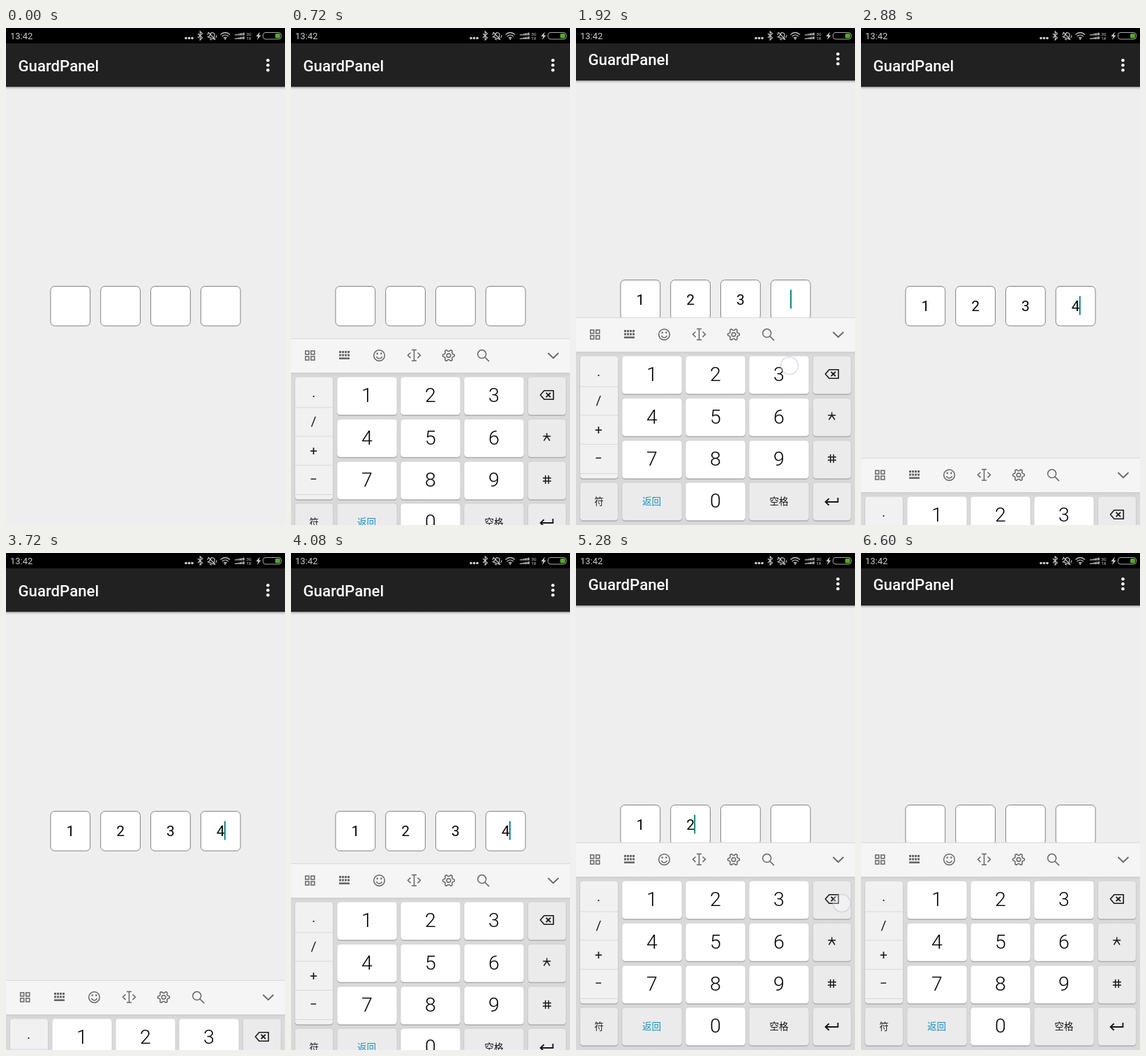
An HTML page for the animation above (6840 ms loop, 400 by 711 pixels).

```html
<!DOCTYPE html>
<html lang="en">
<head>
<meta charset="utf-8">
<title>Code entry</title>
<style>
  html, body { margin: 0; width: 100%; height: 100%; overflow: hidden; background: #eee; }
  svg { display: block; width: 100%; height: 100%; }
  text { font-family: Roboto, "Noto Sans", sans-serif; }
  .mid { text-anchor: middle; }
  .num { font: 300 28.5px Roboto, "Noto Sans", sans-serif; fill: #000; }
  .sym { font: 19px Roboto, sans-serif; fill: #181818; }
  .cjk { font: 500 13.5px "Noto Sans CJK SC", "Noto Sans CJK", sans-serif; }
  .line { fill: none; stroke: #666; stroke-width: 1.5; }
  .ink { fill: none; stroke: #181818; stroke-width: 1.6; }
  .stat { fill: none; stroke: #c4c4c4; stroke-width: 1.2; }
</style>
</head>
<body>
<svg viewBox="0 0 400 711" preserveAspectRatio="none">
  <defs>
    <linearGradient id="shade" x2="0" y2="1">
      <stop offset="0" stop-color="#888"/>
      <stop offset=".4" stop-color="#d2d2d2"/>
      <stop offset="1" stop-color="#eee"/>
    </linearGradient>
    <linearGradient id="bed" x2="0" y2="1">
      <stop offset="0" stop-color="#cfcfcf"/>
      <stop offset=".02" stop-color="#dadada"/>
      <stop offset="1" stop-color="#d8d8d8"/>
    </linearGradient>
  </defs>
  <rect width="400" height="711" fill="#eee"/>

  <g id="app">
    <rect y="22" width="400" height="62" fill="#212121"/>
    <rect y="84" width="400" height="4.5" fill="url(#shade)"/>
    <text x="17.5" y="62" font-size="22.2" font-weight="500" fill="#fff">GuardPanel</text>
    <g fill="#fff">
      <circle cx="375.5" cy="46.3" r="2.3"/>
      <circle cx="375.5" cy="53.3" r="2.3"/>
      <circle cx="375.5" cy="60.3" r="2.3"/>
    </g>
    <g id="boxes"></g>
    <rect id="cursor" y="383.5" width="2" height="27" fill="#0b8686"/>
  </g>

  <g id="keyboard">
    <rect width="400" height="49" fill="#f5f5f5"/>
    <rect width="400" height="1" fill="#d9d9d9"/>
    <rect y="49" width="400" height="248" fill="url(#bed)"/>
    <g class="line">
      <path d="M20.7 18h5v5h-5zM28.7 18h5v5h-5zM20.7 26h5v5h-5zM28.7 26h5v5h-5z"/>
      <path d="M69 19.5h15M69 24h15" stroke-width="3" stroke-dasharray="3 1"/>
      <path d="M69 28.7h15" stroke-width="2.6"/>
      <circle cx="126.5" cy="24.5" r="7.8"/>
      <path d="M122.3 26.2q4.2 5.6 8.4 0"/>
      <path d="M123.7 20.5v2.4M129.3 20.5v2.4" stroke-width="2"/>
      <path d="M173 16.5h7M176.5 16.5v15.5M173 32h7M171.5 20.5l-4 3.8 4 3.8M181.5 20.5l4 3.8-4 3.8"/>
      <path id="gear" stroke-linejoin="round"/>
      <circle cx="226" cy="24.5" r="2.8"/>
      <circle cx="273.7" cy="22.6" r="6"/>
      <path d="M278 27l6 6" stroke-width="1.7"/>
      <path d="M368.5 21l7.5 7.2 7.5-7.2" stroke-width="1.8"/>
    </g>
    <g id="keys"></g>
    <g class="ink">
      <path d="M357.5 81l5.5-6.2h13.3v12.4h-13.3z" stroke-linejoin="round"/>
      <path d="M365.7 77.8l6.4 6.4M372.1 77.8l-6.4 6.4" stroke-width="1.9"/>
      <path d="M366.8 135.5v5M361.3 140h11M366.8 140l-4.3 6.5M366.8 140l4.3 6.5" stroke-width="1.4"/>
      <path d="M364.8 196v12M369.3 196v12M361 199.8h12M361 204.3h12" stroke-width="1.5"/>
      <path d="M375.5 258v6h-17M362.7 259.3l-5 4.7 5 4.7" stroke-width="1.9"/>
    </g>
  </g>

  <circle id="touch" r="12.5"/>

  <rect width="400" height="22" fill="#000"/>
  <text x="6" y="16" font-size="13" fill="#ccc">13:42</text>
  <g fill="#d0d0d0">
    <circle cx="258" cy="14.5" r="1.8"/>
    <circle cx="262.5" cy="14.5" r="1.8"/>
    <circle cx="267" cy="14.5" r="1.8"/>
    <path d="M364 5.5l-5.5 6.5h3l-1.5 5 5.5-6.5h-3z"/>
    <g id="bars"></g>
    <text x="344.5" y="10.5" font-size="6">3G</text>
    <text x="344.5" y="16.5" font-size="6">1X</text>
  </g>
  <g class="stat">
    <path d="M275 8l6.5 6-3.2 3v-12l3.2 3-6.5 6"/>
    <path transform="rotate(20 295 11)" d="M290.5 14.5q2-1.5 2-5 0-3 3-3t3 3q0 3.5 2 5zM294 16.5h3M289 8v4M301.5 8v4"/>
    <path d="M290 6l10 10.5"/>
    <path d="M307.5 9.5q6.8-6 13.6 0M309.7 12q4.6-4 9.2 0M312 14.3q2.3-2 4.6 0"/>
    <circle cx="314.3" cy="15.5" r=".6"/>
    <rect x="368.5" y="6.5" width="26" height="9.5" rx="3.5" stroke="#aaa" stroke-width="1"/>
  </g>
  <rect x="386" y="8" width="7" height="6.5" rx="1.5" fill="#4fae1f"/>
</svg>
<script>
const LOOP = 6840, TICK = 120, KEYBOARD_TOP = 414, KEYBOARD_H = 297;
const $ = id => document.getElementById(id);

function add(parent, tag, attrs, label = '') {
  const el = document.createElementNS('http://www.w3.org/2000/svg', tag);
  for (const k in attrs) el.setAttribute(k, attrs[k]);
  el.textContent = label;
  return parent.appendChild(el);
}

// Code boxes
const BOX_STEP = 71.8;
const digits = [0, 1, 2, 3].map(i => {
  const x = 63.9 + BOX_STEP * i;
  add($('boxes'), 'rect', { x, y: 369.5, width: 56.8, height: 56.6, rx: 6, fill: '#fff', stroke: '#777', 'stroke-width': .9 });
  return add($('boxes'), 'text', { x: x + 28.4, y: 405.3, class: 'mid', 'font-size': 21, fill: '#0a0a0a' }, i + 1);
});

// Keys
const COLS = [[5.5, 55], [66, 86], [157, 86], [248, 86], [339.5, 55]];
const ROWS = [55, 115.5, 176, 236];
const keyRects = {};

function addKey(name, col, row, fill, height = 54.5) {
  const [x, width] = COLS[col], y = ROWS[row];
  const shape = { x, width, height, rx: 4.5 };
  add($('keys'), 'rect', { ...shape, y: y + 1.3, fill: '#a3a3a3' });
  keyRects[name] = add($('keys'), 'rect', { ...shape, y, fill, stroke: '#c4c4c4', 'stroke-width': .6 });
  keyRects[name].dataset.fill = fill;
}
function addLabel(label, x, y, cls, attrs = {}) {
  add($('keys'), 'text', { x, y, class: 'mid ' + cls, ...attrs }, label);
}

const GRAY = '#ebebec';
addKey('symbols', 0, 0, '#f1f1f1', 175.5);
for (const y of [98.5, 139.5, 181, 223])
  add($('keys'), 'rect', { x: 6, y, width: 54, height: 1, fill: '#d8d8d8' });
[['.', 84], ['/', 125], ['+', 167], ['−', 208]].forEach(([s, y]) => addLabel(s, 32.5, y, 'sym'));
for (let n = 1; n <= 9; n++) {
  const col = (n - 1) % 3, row = Math.floor((n - 1) / 3);
  addKey(n, col + 1, row, '#fff');
  addLabel(n, 109 + 91 * col, ROWS[row] + 36, 'num');
}
['del', 'star', 'hash', 'enter'].forEach((name, row) => addKey(name, 4, row, GRAY));
addKey('more', 0, 3, GRAY);
addKey('back', 1, 3, GRAY);
addKey(0, 2, 3, '#fff');
addKey('space', 3, 3, GRAY);
addLabel('符', 33, 267.5, 'cjk', { fill: '#222' });
addLabel('返回', 108.5, 267.5, 'cjk', { fill: '#1590cc' });
addLabel(0, 200, 272, 'num');
addLabel('空格', 291, 267.5, 'cjk', { fill: '#111' });

// Gear outline and signal bars
$('gear').setAttribute('d', 'M' + Array.from({ length: 48 }, (_, i) => {
  const a = i / 48 * 2 * Math.PI, r = 7.2 + 1.2 * Math.tanh(3 * Math.cos(6 * a));
  return (226 + r * Math.cos(a)).toFixed(2) + ' ' + (24.5 + r * Math.sin(a)).toFixed(2);
}).join('L') + 'Z');
for (let i = 0; i < 6; i++)
  for (const base of [10.5, 16]) {
    const height = 1.3 + .5 * i;
    add($('bars'), 'rect', { x: 328 + 2.4 * i, y: base - height, width: 1.7, height });
  }

// Each row: start time, value held until the next row
const PAN = [[0, 0], [1320, 4], [1440, 8], [1560, 9], [2520, 6], [2640, 2], [2760, 0],
  [4800, 3], [4920, 7], [5040, 9]];
const COUNT = [[0, 0], [1320, 1], [1560, 2], [1920, 3], [2160, 4],
  [4800, 3], [5280, 2], [5760, 1], [6240, 0]];
const CURSOR = [[0, -1], [240, 0], [720, -1], [1320, 1], [1560, 2], [1920, 3], [2400, -1],
  [2760, 3], [3240, -1], [3720, 3], [4200, -1], [4800, 2], [5280, 1], [5760, 0], [6600, -1]];
const HIDE = [[2400, 4], [2520, 16], [2640, 62], [2760, 130], [2880, 201], [3000, 266], [3120, KEYBOARD_H]];
// Touches: press time, release time, key, x, y, key lights up
const TOUCHES = [
  [1080, 1320, 1, 110, 497, true], [1440, 1560, 2, 203, 492, true],
  [1680, 1920, 3, 306, 483, true], [2040, 2160, 4, 111, 555, false],
  [4560, 4800, 'del', 378, 498, true], [5040, 5280, 'del', 381, 501, true],
  [5520, 5760, 'del', 380, 500, true], [6000, 6240, 'del', 374, 496, true],
  [6360, 6360, 'del', 364, 489, false]
];

const held = (table, t) => table.reduce((v, row) => row[0] <= t ? row[1] : v, 0);

function slide(t) {
  const rise = start => KEYBOARD_H * Math.max(0, 1 - Math.max(0, t - start) / 725) ** 2;
  if (t < 2400) return rise(225);
  return t < 3585 ? held(HIDE, t) : rise(3585);
}

function draw(time) {
  const t = Math.floor(time % LOOP / TICK) * TICK;
  $('app').setAttribute('transform', `translate(0 ${-held(PAN, t)})`);
  $('keyboard').setAttribute('transform', `translate(0 ${Math.round(KEYBOARD_TOP + slide(t))})`);

  const count = held(COUNT, t), box = held(CURSOR, t);
  digits.forEach((d, i) => d.setAttribute('visibility', i < count ? 'visible' : 'hidden'));
  $('cursor').setAttribute('visibility', box < 0 ? 'hidden' : 'visible');
  $('cursor').setAttribute('x', 91.7 + BOX_STEP * box + (box < count ? 5.7 : 0));

  const hit = TOUCHES.find(([from, to]) => t >= from && t <= to);
  for (const k in keyRects) keyRects[k].setAttribute('fill', keyRects[k].dataset.fill);
  $('touch').setAttribute('visibility', hit ? 'visible' : 'hidden');
  if (hit) {
    const [, to, key, x, y, lit] = hit, down = t < to;
    if (lit && down) keyRects[key].setAttribute('fill', '#cacaca');
    const look = { cx: x, cy: y, fill: `rgba(255,255,255,${down ? .62 : .3})`,
      stroke: down ? '#c3c3dc' : 'rgba(190,190,220,.5)', 'stroke-width': 1.6 };
    for (const k in look) $('touch').setAttribute(k, look[k]);
  }
}

const start = performance.now();
function loop() {
  draw(performance.now() - start);
  requestAnimationFrame(loop);
}
loop();
</script>
</body>
</html>
```
